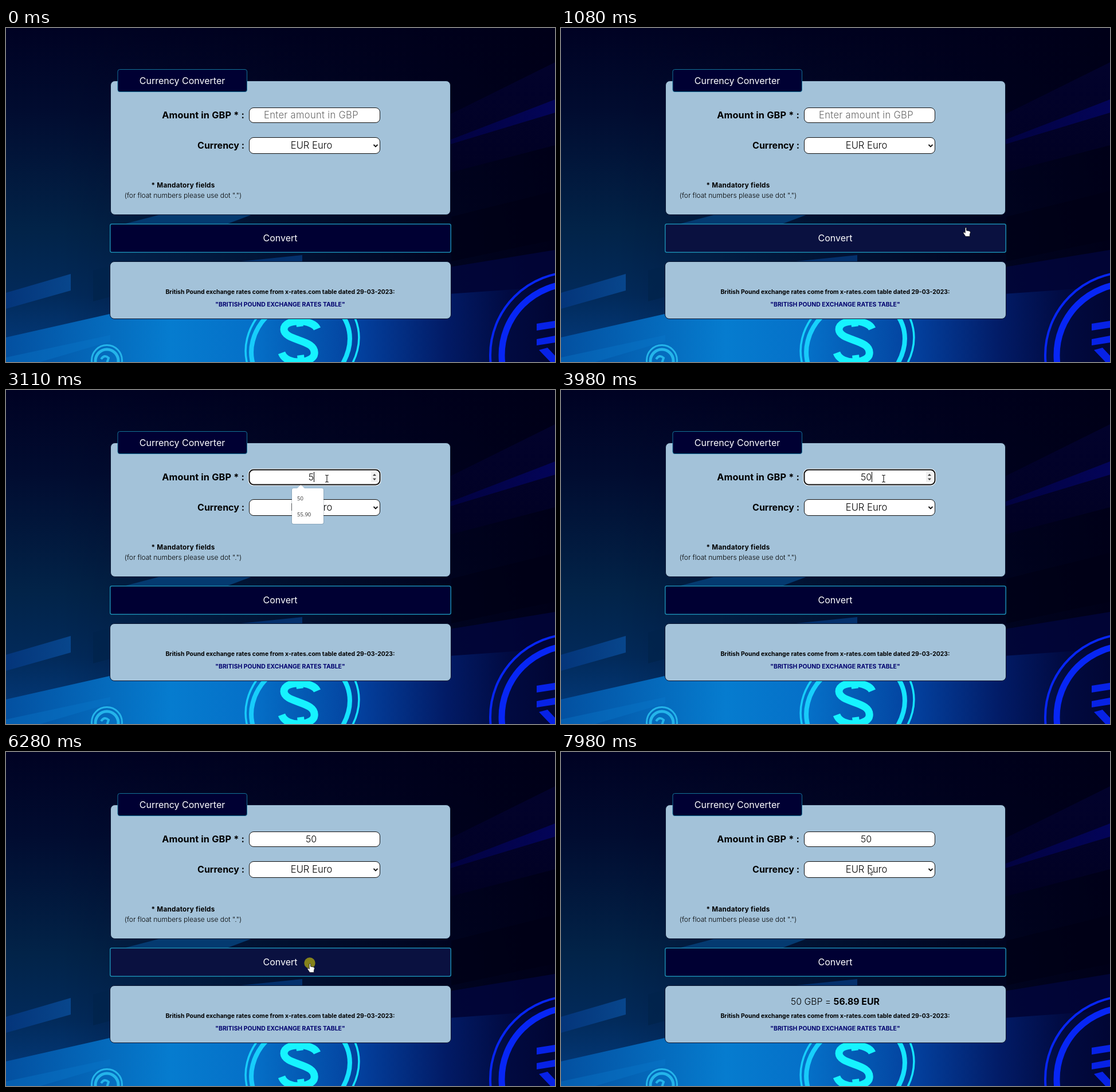
An HTML page for the animation above (8 s loop, 958 by 584 pixels).

```html
<!DOCTYPE html>
<html lang="en">
<head>
<meta charset="utf-8">
<title>Currency Converter</title>
<style>
  html, body { margin: 0; width: 100%; height: 100%; overflow: hidden; background: #000022; }
  svg { display: block; width: 958px; height: 584px; font-family: Inter, "Open Sans", sans-serif; font-size: 16px; }
  .mid { text-anchor: middle; }
  .end { text-anchor: end; }
  .bold { font-weight: 700; }
  .light { font-weight: 300; }
  .small { font-size: 10.45px; font-weight: 700; }
  .list { font: 9.5px "Open Sans", sans-serif; fill: #333; }
  .panel { fill: #a3c2d9; stroke: #06142f; }
  .field { fill: #fff; stroke: #111; }
</style>
</head>
<body>
<svg viewBox="0 0 958 584">
  <defs>
    <linearGradient id="sky" x1="0" y1="0" x2="0" y2="1">
      <stop offset="0" stop-color="#000223"/>
      <stop offset=".25" stop-color="#010c30"/>
      <stop offset=".6" stop-color="#022348"/>
      <stop offset=".8" stop-color="#022a5a"/>
      <stop offset="1" stop-color="#033c80"/>
    </linearGradient>
    <linearGradient id="shade">
      <stop offset=".1" stop-color="#00001a" stop-opacity="0"/>
      <stop offset=".8" stop-color="#00001a" stop-opacity=".9"/>
      <stop offset="1" stop-color="#000018"/>
    </linearGradient>
    <linearGradient id="beam">
      <stop offset="0" stop-color="#02023c"/>
      <stop offset="1" stop-color="#030458"/>
    </linearGradient>
    <linearGradient id="band" x1="0" y1="0" x2="0" y2="1">
      <stop offset="0" stop-color="#02022c"/>
      <stop offset="1" stop-color="#010122"/>
    </linearGradient>
    <linearGradient id="floor">
      <stop offset="0" stop-color="#0350a0"/>
      <stop offset=".3" stop-color="#067ccf"/>
      <stop offset=".45" stop-color="#0570c8"/>
      <stop offset=".65" stop-color="#033f9c"/>
      <stop offset=".8" stop-color="#021b66"/>
      <stop offset=".92" stop-color="#010a40"/>
      <stop offset="1" stop-color="#010634"/>
    </linearGradient>
    <linearGradient id="slab">
      <stop offset="0" stop-color="#04357a"/>
      <stop offset="1" stop-color="#08468c"/>
    </linearGradient>
    <linearGradient id="ring">
      <stop offset="0" stop-color="#18c8fa"/>
      <stop offset="1" stop-color="#14e6ff"/>
    </linearGradient>
  </defs>

  <g id="backdrop">
    <rect width="958" height="584" fill="url(#sky)"/>
    <rect width="958" height="584" fill="url(#shade)"/>
    <path d="M700 188L958 60V205L700 272Z" fill="url(#band)"/>
    <path d="M740 209L958 125V148L740 214Z" fill="url(#beam)"/>
    <path d="M777 330L958 285V370L777 408Z" fill="#000014" opacity=".6"/>
    <path d="M700 430L958 388V470L700 520Z" fill="#020848" opacity=".6"/>
    <path d="M0 541L190 498L700 470L958 452V584H0Z" fill="url(#floor)"/>
    <path d="M0 463L113 430V459L0 491Z" fill="url(#slab)"/>
    <path d="M152 424L182 416V470L152 478Z" fill="#02244c" opacity=".8"/>
    <path d="M0 576L182 537V548L60 584H0Z" fill="#0a79cc" opacity=".35"/>
    <path d="M205 343L270 326H430L385 343Z" fill="#043a70"/>
    <path d="M400 409L517 397V409Z" fill="#04306c"/>
    <g fill="none">
      <g stroke="url(#ring)">
        <ellipse cx="517" cy="553" rx="103" ry="90" stroke-width="3.5" transform="rotate(-35 517 553)"/>
        <ellipse cx="514" cy="555" rx="90" ry="77" stroke-width="8" transform="rotate(-35 514 555)"/>
      </g>
      <g stroke="#16f3ff">
        <path d="M543 526C536 509 485 507 485 527C486 548 542 544 538 570C536 586 490 592 481 568" stroke-width="13"/>
        <path d="M510 500L513 522M514 572L516 590" stroke-width="12"/>
      </g>
      <g stroke="#24b4ea">
        <circle cx="176" cy="581" r="26.5" stroke-width="3"/>
        <circle cx="176" cy="582" r="20" stroke-width="5"/>
        <path d="M166 579Q172 570 179 577L176 586" stroke-width="4"/>
      </g>
      <g stroke="#0726f5">
        <circle cx="990" cy="572" r="145" stroke-width="4"/>
        <circle cx="990" cy="572" r="125" stroke-width="11"/>
      </g>
    </g>
    <path d="M926 517L958 512V524L926 529ZM926 544L958 538V550L926 555ZM930 563L945 559L958 573V584H950Z" fill="#0722e6"/>
  </g>

  <rect class="panel" x="182.5" y="92.5" width="593" height="234" rx="7.5"/>
  <rect x="195" y="72.5" width="225.5" height="39" rx="3.5" fill="#000033" stroke="#147396"/>
  <text class="mid" x="307.5" y="98" fill="#fff">Currency Converter</text>

  <text class="bold end" x="416" y="157.5" font-size="16.3" letter-spacing=".15">Amount in GBP * :</text>
  <text class="bold end" x="416" y="211">Currency :</text>

  <rect id="halo" x="422.5" y="137.5" width="232" height="30" rx="9.5" fill="#fff"/>
  <rect id="amount" class="field" x="424.5" y="139.5" width="228" height="26" rx="7.5"/>
  <text id="hint" class="light mid" x="532.5" y="157.5" font-size="16.6" letter-spacing=".3" fill="#666">Enter amount in GBP</text>
  <text id="value" class="light mid" x="532.5" y="157.5"></text>
  <rect id="caret" y="143" width="1" height="18"/>
  <g id="spinner">
    <rect x="637" y="143" width="12" height="18" fill="#f0f0f0"/>
    <path d="M640 150L643 146.5L646 150ZM640 154.5L643 158L646 154.5Z" fill="#444"/>
  </g>

  <rect class="field" x="424.5" y="191.5" width="228" height="28" rx="7.5"/>
  <text class="light mid" x="533" y="211" font-size="16.6">EUR Euro</text>
  <path d="M641.5 204L645 207.5L648.5 204" fill="none" stroke="#111" stroke-width="1.8"/>

  <text class="bold mid" x="309" y="278.5" font-size="11.7" letter-spacing=".25">* Mandatory fields</text>
  <text class="light mid" x="309" y="296.5" font-size="12">(for float numbers please use dot ".")</text>

  <rect id="button" x="181.75" y="342.75" width="594.5" height="49.5" rx="3" stroke="#1a8aae" stroke-width="1.5"/>
  <text class="mid" x="478.5" y="373" fill="#fff">Convert</text>

  <rect class="panel" x="181.5" y="408.5" width="595" height="100" rx="7.5"/>
  <text id="result" class="mid" x="478.5" y="441.5" font-size="15.8"><tspan class="light">50 GBP = </tspan><tspan class="bold">56.89 EUR</tspan></text>
  <text class="small mid" x="478.5" y="464.5">British Pound exchange rates come from x-rates.com table dated 29-03-2023:</text>
  <text class="small mid" x="478.5" y="487" fill="#00006e">"BRITISH POUND EXCHANGE RATES TABLE"</text>

  <g id="popup">
    <rect x="498" y="172" width="57" height="63" rx="4" fill="#456" opacity=".25"/>
    <path d="M502 172H508L514.5 166L521 172H551Q554 172 554 175V231Q554 234 551 234H502Q499 234 499 231V175Q499 172 502 172Z" fill="#fff"/>
    <text class="list" x="508" y="193">50</text>
    <text class="list" x="508" y="220.5">55.90</text>
  </g>

  <circle id="click" cx="530" cy="369" r="9.7" fill="#85821c"/>
  <g id="cursor">
    <path id="arrow" d="M.5 .5V12.5L3.2 10L5.2 14.5L7.2 13.6L5.3 9.3H9Z" fill="#fff" stroke="#111" stroke-width=".9"/>
    <path id="beamCursor" d="M-3 -6H-1L0 -5L1 -6H3M0 -5V5M-3 6H-1L0 5L1 6H3" fill="none" stroke="#111" stroke-width="1.1"/>
    <path id="hand" d="M-.8 1.5Q.4 .3 1.5 1.5V6L6.5 7Q8.7 7.5 8.4 9.5L7.3 13.5V16.5H0L-3.8 10.8Q-4.2 8.3 -2 9L-.8 10.5Z" fill="#fff" stroke="#111" stroke-width=".8"/>
  </g>
</svg>
<script>
  const LOOP = 8000;
  const el = id => document.getElementById(id);
  const show = (id, on) => el(id).setAttribute("visibility", on ? "visible" : "hidden");
  const set = (id, attrs) => { for (const k in attrs) el(id).setAttribute(k, attrs[k]); };

  const linear = u => u;
  const slowEnd = u => 1 - (1 - u) ** 1.5;
  const smooth = u => u * u * (3 - 2 * u);

  // Pointer moves: first step, last step, step count, destination, easing
  const origin = [904, 578];
  const moves = [
    [590, 940, 6, 752, 408, linear],
    [1010, 1360, 6, 615, 227, linear],
    [1430, 1780, 6, 560, 155, slowEnd],
    [3640, 3980, 6, 563, 155, linear],
    [4510, 5270, 12, 564, 203, smooth],
    [5400, 5810, 7, 530, 369, smooth],
    [7080, 7640, 9, 534, 192, smooth],
    [7840, 7980, 3, 536, 201, linear]
  ];

  function pointer(t) {
    let [x, y] = origin;
    for (const [from, to, steps, tx, ty, ease] of moves) {
      if (t < from) break;
      const step = Math.floor((t - from) / ((to - from) / (steps - 1)) + 1e-6) + 1;
      const u = ease(Math.min(1, step / steps));
      x += (tx - x) * u;
      y += (ty - y) * u;
    }
    return [Math.round(x), Math.round(y)];
  }

  const inside = (x, y, l, t, r, b) => x >= l && x <= r && y >= t && y <= b;

  function draw(t) {
    const [x, y] = pointer(t);
    const seen = t >= 590;
    const overInput = seen && inside(x, y, 424, 139, 653, 166);
    const overButton = seen && inside(x, y, 181, 342, 777, 393);
    const focused = t >= 2050 && t < 6280;
    const value = t < 3110 ? "" : t < 3640 ? "5" : "50";

    set("cursor", { transform: `translate(${x} ${y})` });
    show("arrow", seen && !overInput && !overButton);
    show("beamCursor", overInput);
    show("hand", overButton);
    set("button", { fill: overButton ? "#0a1140" : "#000033" });

    show("halo", focused);
    set("amount", { "stroke-width": focused ? 2 : 1 });
    show("spinner", focused || overInput);
    show("hint", !value);
    el("value").textContent = value;

    // The caret restarts its blink at each key press
    const keyTime = t < 3110 ? 2050 : t < 3640 ? 3110 : 3640;
    show("caret", focused && Math.floor((t - keyTime) / 530) % 2 === 0);
    set("caret", { x: 532 + value.length * 5 });

    show("popup", t >= 3110 && t < 3710);
    show("click", t >= 6280 && t < 6350);
    show("result", t >= 6350);
  }

  const start = performance.now();
  function tick() {
    draw((performance.now() - start) % LOOP);
    requestAnimationFrame(tick);
  }
  draw(0);
  requestAnimationFrame(tick);
</script>
</body>
</html>
```
